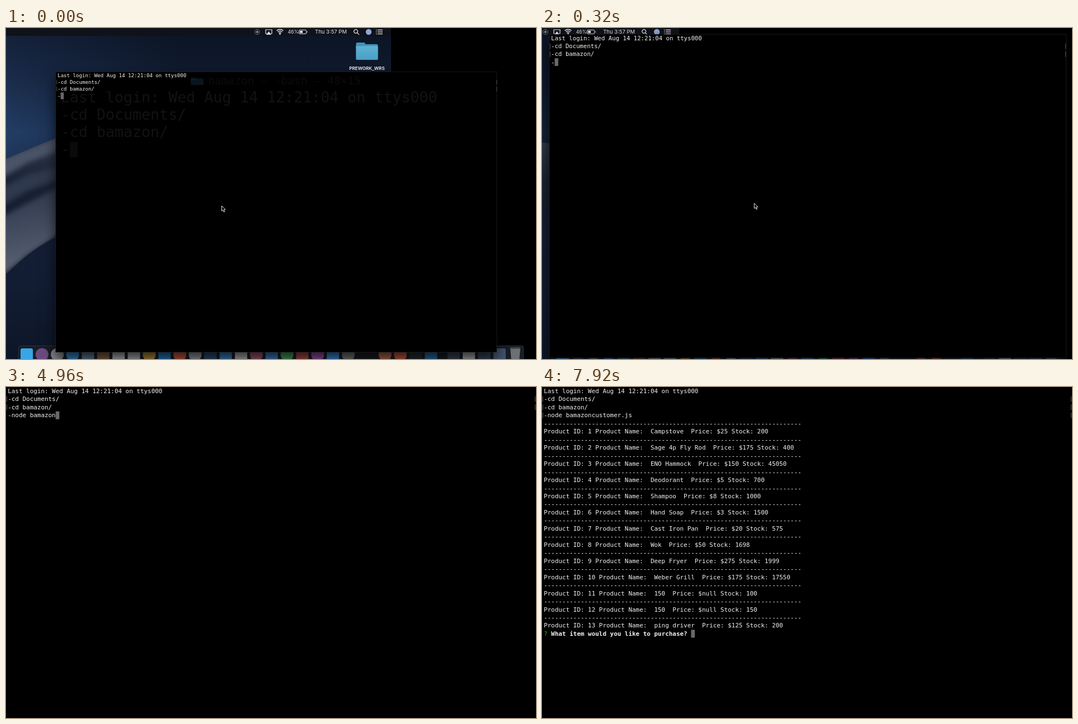
These frames come from a looping animation (947 px wide and 592 px high, 8 s). An HTML page with a canvas:

```html
<!DOCTYPE html>
<html lang="en">
<head>
<meta charset="utf-8">
<title>Terminal session</title>
<style>
html, body { margin: 0; width: 100%; height: 100%; overflow: hidden; background: #000; }
canvas { display: block; width: 947px; height: 592px; }
</style>
</head>
<body>
<canvas id="stage" width="947" height="592"></canvas>
<script>
const W = 947, H = 592, LOOP = 8000, STEP = 80, ZOOM_END = 800;
const CELL = 6.58, LINE = 14.46, LEFT = 3.2, FIRST = 7.2;
const MONO = '"DejaVu Sans Mono", monospace';
const SANS = 'Inter, sans-serif';
const ctx = document.getElementById('stage').getContext('2d');

const header = ['Last login: Wed Aug 14 12:21:04 on ttys000', '-cd Documents/', '-cd bamazon/'];

// [time, command typed so far]
const typing = [
  [0, ''], [1760, 'n'], [1920, 'no'], [2000, 'nod'], [2160, 'node'], [2240, 'node '],
  [2880, 'node b'], [2960, 'node ba'], [3120, 'node bam'], [3280, 'node bama'],
  [3440, 'node bamaz'], [3600, 'node bamazo'], [3760, 'node bamazon'],
  [3920, 'node bamazonC'], [4080, 'node bamazonCu'], [4160, 'node bamazonCus'],
  [4560, 'node bamazonCu'], [4800, 'node bamazonC'], [4960, 'node bamazon'],
  [5440, 'node bamazonc'], [5600, 'node bamazoncu'], [5840, 'node bamazoncustomer.js ']
];
const COMPLETED = 5840, ENTERED = 6320, LISTED = 6880;

const products = [
  ['Campstove', 25, 200], ['Sage 4p Fly Rod', 175, 400], ['ENO Hammock', 150, 45050],
  ['Deodorant', 5, 700], ['Shampoo', 8, 1000], ['Hand Soap', 3, 1500],
  ['Cast Iron Pan', 20, 575], ['Wok', 50, 1698], ['Deep Fryer', 275, 1999],
  ['Weber Grill', 175, 17550], ['150', null, 100], ['150', null, 150], ['ping driver', 125, 200]
];
const listing = products.flatMap(([name, price, stock], i) => [
  '-'.repeat(70),
  `Product ID: ${i + 1} Product Name:  ${name}  Price: $${price} Stock: ${stock}`
]);
const question = 'What item would you like to purchase?';

function rect(x, y, w, h, color) {
  ctx.fillStyle = color;
  ctx.fillRect(x, y, w, h);
}

function disc(x, y, r, color) {
  ctx.fillStyle = color;
  ctx.beginPath();
  ctx.arc(x, y, r, 0, 7);
  ctx.fill();
}

function box(x, y, w, h, r, color) {
  ctx.fillStyle = color;
  ctx.beginPath();
  ctx.roundRect(x, y, w, h, r);
  ctx.fill();
}

function poly(points, color) {
  ctx.fillStyle = color;
  ctx.beginPath();
  points.forEach(([x, y]) => ctx.lineTo(x, y));
  ctx.closePath();
  ctx.fill();
}

function stroke(color, width, draw) {
  ctx.strokeStyle = color;
  ctx.lineWidth = width;
  ctx.beginPath();
  draw();
  ctx.stroke();
}

function text(str, x, y, font, color, align = 'left') {
  ctx.font = font;
  ctx.fillStyle = color;
  ctx.textAlign = align;
  ctx.textBaseline = 'alphabetic';
  ctx.fillText(str, x, y);
}

function fade(x0, y0, x1, y1, ...colors) {
  const g = ctx.createLinearGradient(x0, y0, x1, y1);
  colors.forEach((c, i) => g.addColorStop(i / (colors.length - 1), c));
  return g;
}

function wallpaper() {
  rect(0, 0, 688, H, fade(0, 0, 0, 280, '#131f36', '#1a2c4b', '#233d65', '#1c2f50'));
  rect(0, 0, 688, H, fade(0, 0, 320, 0, 'rgba(4,9,20,0)', 'rgba(6,11,21,.55)'));
  for (let i = 0; i < 60; i++) {
    rect((i * 137.5) % 688, 16 + (i * 61.8) % 150, 1, 1, 'rgba(170,195,230,.15)');
  }
  // far dunes, running into shade on the right
  poly([[0, 234], [88, 197], [190, 184], [288, 189], [688, 230], [688, H], [0, H]],
    fade(0, 190, 0, 450, '#343d50', '#1a2335', '#121b2e', '#0c1425'));
  // soft folds of the lit slope
  ctx.save();
  ctx.beginPath();
  ctx.moveTo(0, 234);
  ctx.lineTo(88, 197);
  ctx.lineTo(230, 190);
  ctx.lineTo(230, 335);
  ctx.quadraticCurveTo(88, 355, 0, 441);
  ctx.clip();
  ctx.filter = 'blur(4px)';
  poly([[-20, 240], [88, 197], [120, 195], [88, 222], [40, 240], [-20, 275]], '#4a5468');
  poly([[-20, 292], [40, 262], [120, 240], [120, 262], [40, 290], [-20, 325]], '#2f394e');
  poly([[-20, 345], [40, 312], [120, 272], [120, 345], [88, 374], [40, 405], [-20, 455]],
    fade(0, 300, 30, 420, '#2f384c', '#414a5e', '#565e70'));
  ctx.restore();
  ctx.beginPath();
  ctx.moveTo(0, 441);
  ctx.quadraticCurveTo(50, 390, 100, 369);
  ctx.quadraticCurveTo(180, 335, 300, 335);
  ctx.lineTo(688, 335);
  ctx.lineTo(688, H);
  ctx.lineTo(0, H);
  ctx.fillStyle = fade(0, 340, 0, H, '#141f35', '#121c32', '#0d1628');
  ctx.fill();
}

function menuBar() {
  rect(0, 0, 688, 14, '#0f1218');
  const ink = '#e4e6e9';
  stroke('#777b82', 1, () => ctx.arc(449, 7, 4.5, 0, 7));
  rect(447, 5, 4, 4, '#777b82');
  stroke(ink, 1.2, () => { ctx.moveTo(466, 10); ctx.lineTo(464, 10); ctx.lineTo(464, 3); ctx.lineTo(475, 3); ctx.lineTo(475, 10); ctx.lineTo(473, 10); });
  poly([[469.5, 6], [474, 12], [465, 12]], ink);
  [3, 6, 9].forEach(r => stroke(ink, 1.5, () => ctx.arc(489.5, 11.5, r, -2.3, -.84)));
  disc(489.5, 11, 1.2, ink);
  text('46%', 503.5, 10.2, `8.6px ${SANS}`, ink);
  stroke(ink, 1, () => ctx.roundRect(523.5, 3.5, 13, 7, 1.5));
  rect(525, 5, 5, 4, ink);
  rect(538, 6, 1, 2, ink);
  text('Thu 3:57 PM', 552, 10.4, `9.5px ${SANS}`, ink);
  stroke(ink, 1.2, () => { ctx.arc(625, 6, 3.3, .8, 7.08); ctx.lineTo(631, 12); });
  disc(648, 7, 5.2, '#8fa5d8');
  [3.5, 7, 10.5].forEach(y => {
    rect(661, y - .6, 1.5, 1.3, ink);
    rect(664, y - .6, 9, 1.3, ink);
  });
}

function folder(x, y, w, h) {
  box(x, y, w * .42, h * .4, 2, '#3c93ba');
  box(x, y + h * .1, w, h * .9, 2, '#3f94ba');
  box(x, y + h * .2, w, h * .8, 2, fade(0, y, 0, y + h, '#62b5d6', '#4a9fc5'));
}

function desktop(edge) {
  ctx.save();
  ctx.translate(edge - 688, 0);
  wallpaper();
  menuBar();
  folder(625.5, 26, 39, 31);
  text('PREWORK_WRS', 645, 74.8, `600 8.1px ${SANS}`, '#fff', 'center');
  ctx.restore();
}

const dockColors = ['#38a5e6', '#6b4a80', '#85898d', '#3488d2', '#5d7a90', '#80603f', '#b5b5b5',
  '#a9adb0', '#b88f3a', '#2279bd', '#c9583d', '#9a9aa6', '#274b72', '#397ebd', '#b3b3b0',
  '#a35570', '#3c7cc0', '#42a05c', '#b04949', '#9a4fac', '#3987d9', '#74787d', '#2d3136',
  '#b8654d', '#c7573c', '#272a30', '#266aa0', '#3a4354', '#a9adb0', '#36475f', '#44546d'];
const roundIcons = [1, 2, 3, 8, 10, 11, 15, 17, 19, 21, 23, 24];

function dock(y) {
  box(22, y, 903, 40, 4, '#181c23');
  stroke('#2d323a', 1, () => ctx.roundRect(22.5, y + .5, 902, 40, 4));
  dockColors.forEach((color, i) => {
    const x = 37 + i * 27.36 + (i > 22 ? 11 : 0) + (i > 26 ? 13 : 0);
    if (i === 22) return;
    if (roundIcons.includes(i)) disc(x, y + 16, 11.5, color);
    else box(x - 11, y + 5, 22, 22, 3, color);
  });
  poly([[901, y + 4], [919, y + 4], [917, y + 28], [903, y + 28]], '#6c7175');
  rect(902, y + 3, 16, 3, '#42474b');
}

// Unscaled small-window picture that dissolves during the zoom
function ghost(alpha) {
  ctx.save();
  ctx.globalAlpha = alpha;
  folder(330, 88, 23, 14);
  text('bamazon — -bash — 48×15', 361, 101, `19.7px ${MONO}`, '#999');
  [...header, '-'].forEach((s, i) => text(s, 98, 133 + i * 31, `26.6px ${MONO}`, '#fff'));
  rect(114, 204, 14, 27, '#888');
  ctx.restore();
}

function windowPane(x, y, w, h) {
  ctx.save();
  ctx.shadowColor = 'rgba(0,0,0,.75)';
  ctx.shadowBlur = 22;
  ctx.shadowOffsetY = 12;
  rect(x, y, w, h, '#000');
  ctx.restore();
  stroke('rgba(85,85,90,.3)', 1, () => ctx.rect(x, y, w, h));
}

const cellX = col => LEFT + col * CELL;
const lineY = row => FIRST + row * LINE;

function line(str, row, col = 0, color = '#f2f2f2', weight = '') {
  text(str, cellX(col), lineY(row) + 3.7, `${weight} 10.93px ${MONO}`, color);
}

function caret(col, row) {
  rect(cellX(col), lineY(row) - 7, CELL, 14, '#696969');
}

function marks(row) {
  rect(1, lineY(row) - 5, 1, 10, '#555');
  rect(945, lineY(row) - 5, 1, 10, '#555');
}

function session(t) {
  const typed = typing.findLast(([at]) => at <= t)[1];
  header.forEach((s, i) => line(s, i));
  marks(1);
  marks(2);
  if (t >= COMPLETED) marks(3);
  line('-' + typed, 3);
  if (t < ENTERED) caret(typed.length + 1, 3);
  else if (t < LISTED) caret(0, 4);
  else {
    listing.forEach((s, i) => line(s, i + 4));
    line('?', 30, 0, '#2fae2f');
    line(question, 30, 2, '#f4f4f4', 'bold');
    caret(40, 30);
  }
}

function pointer(t) {
  if (t >= 1760) return;
  const p = Math.min(1, Math.max(0, (t - 240) / 560));
  const ease = p * p * (3 - 2 * p);
  const drift = t < 960 ? 0 : t < 1040 ? .5 : 1;
  ctx.save();
  ctx.translate(385.5 - 114 * ease - 10 * drift, 318 - 83 * ease + drift);
  const shape = [[0, 0], [0, 9.3], [2.1, 7.5], [3.7, 11], [5.3, 10.3], [3.8, 6.9], [6.5, 6.7]];
  poly(shape, '#000');
  stroke('#e6e6e6', 1, () => {
    shape.forEach(([x, y]) => ctx.lineTo(x, y));
    ctx.closePath();
  });
  ctx.restore();
}

function render(t) {
  rect(0, 0, W, H, '#000');
  const left = Math.max(0, 1 - t / ZOOM_END);
  const slide = left ** 2.02, zoom = left ** 3.76;
  const x = 88.5 * zoom, y = 78.5 * zoom - .3;
  const w = W - 70 * zoom - x, h = H - 12 * zoom - y;

  if (left) {
    desktop(688 * slide);
    dock(568 + 24 * (1 - slide));
    windowPane(x, y, w, h);
    if (t < 160) ghost(.07 * (1 - t / 160));
  }
  ctx.save();
  ctx.translate(x + zoom, y + .3);
  ctx.scale(w / W, h / H);
  session(t);
  ctx.restore();
  pointer(t);
}

const start = performance.now();
function tick() {
  const t = (performance.now() - start) % LOOP;
  render(Math.floor(t / STEP) * STEP);
  requestAnimationFrame(tick);
}
tick();
</script>
</body>
</html>
```
